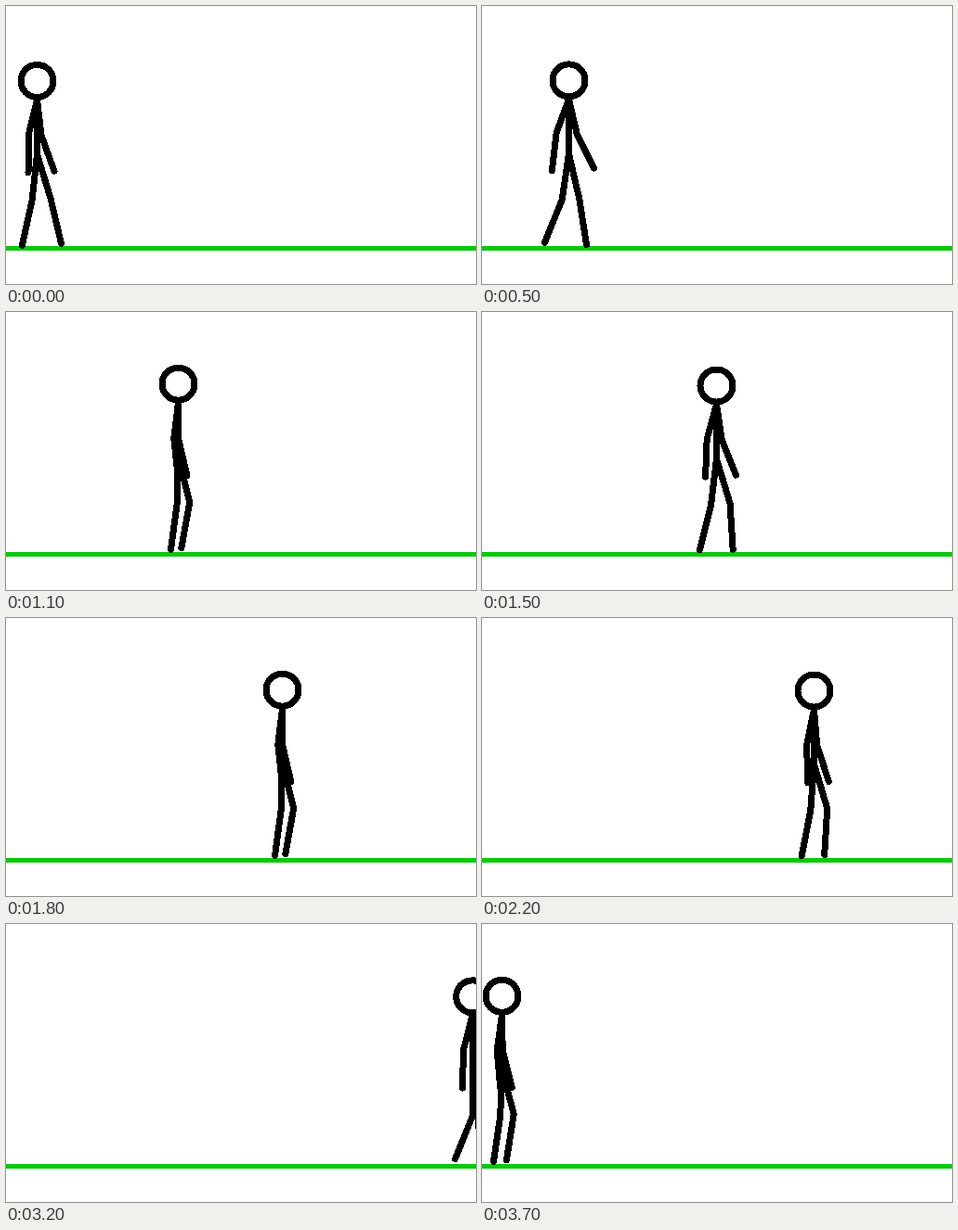
Animation, 506 px wide and 300 px high, one loop 3800 ms. Source, as an HTML page:

```html
<!DOCTYPE html>
<html lang="en">
<head>
<meta charset="utf-8">
<title>Walking stick figure</title>
<style>
  html, body { margin: 0; width: 100%; height: 100%; overflow: hidden; background: #fff; }
  svg { display: block; width: 506px; height: 300px; shape-rendering: crispEdges; }
  #walker { fill: none; stroke: #000; stroke-width: 7; stroke-linecap: round; stroke-linejoin: round; }
</style>
</head>
<body>
<svg viewBox="0 0 506 300">
  <rect y="259" width="506" height="5" fill="#0ac80a"/>
  <g id="walker" transform="translate(.5 .5)">
    <circle id="head" r="17.5"/>
    <path id="limbs"/>
  </g>
  <use href="#walker" x="-553"/>
</svg>
<script>
const FRAME = 100, COUNT = 38;
const UPPER_ARM = 39, FOREARM = 41, THIGH = 50, SHIN = 50;
const STRIDE = 56;

// The pace varies a little: frame, x, steps walked
const pace = [
  [0, 33, 0], [5, 93, 1.125], [11, 185, 2.607],
  [15, 252, 3.786], [22, 357, 5.7], [37, 574, 9.625]
];

const head = document.getElementById('head');
const limbs = document.getElementById('limbs');

const mix = (a, b, k) => a + (b - a) * k;
const drop = (length, dx) => Math.sqrt(length * length - dx * dx);

function smooth(k) {
  k = Math.min(1, k);
  return k * k * (3 - 2 * k);
}

function progress(frame) {
  const i = Math.max(1, pace.findIndex(key => key[0] >= frame));
  const a = pace[i - 1], b = pace[i];
  const k = (frame - a[0]) / (b[0] - a[0]);
  return { x: mix(a[1], b[1], k), steps: mix(a[2], b[2], k) };
}

// mid and end are sideways offsets of the joint and the tip
function limb(x, y, mid, end, upper, lower) {
  const midY = y + drop(upper, mid);
  const endY = midY + drop(lower, end - mid);
  return `M${x} ${y}L${x + mid} ${midY}L${x + end} ${endY}`;
}

function draw(frame) {
  const { x, steps } = progress(frame);
  const p = steps % 1;
  const reach = Math.min(1, 0.6 + frame / 10); // grows over the first step
  const y = 78.6 + 1.8 * Math.cos(2 * Math.PI * p);
  const neck = y + 20, hip = y + 79;
  const swing = reach * Math.cos(Math.PI * (steps - 0.04));

  const leg = (knee, foot) => limb(x, hip, knee, foot, THIGH, SHIN);
  const arm = s => limb(x, neck, 11.5 * s - 2.3, 23.5 * s + 4.5, UPPER_ARM, FOREARM);

  // The standing foot stays on its spot while the other one passes it
  const standing = leg(14.5 - 26 * p, 26 - STRIDE * p);
  const passing = leg(
    mix(-9 * reach, 14.5, smooth(p / 0.75)),
    mix(-27 * reach, 26, smooth(p ** 1.2)));

  head.setAttribute('cx', x);
  head.setAttribute('cy', y);
  limbs.setAttribute('d',
    `M${x} ${neck}V${hip}` + standing + passing + arm(swing) + arm(-swing));
}

const began = performance.now();
function tick() {
  draw(Math.floor((performance.now() - began) / FRAME) % COUNT);
  requestAnimationFrame(tick);
}
tick();
</script>
</body>
</html>
```
